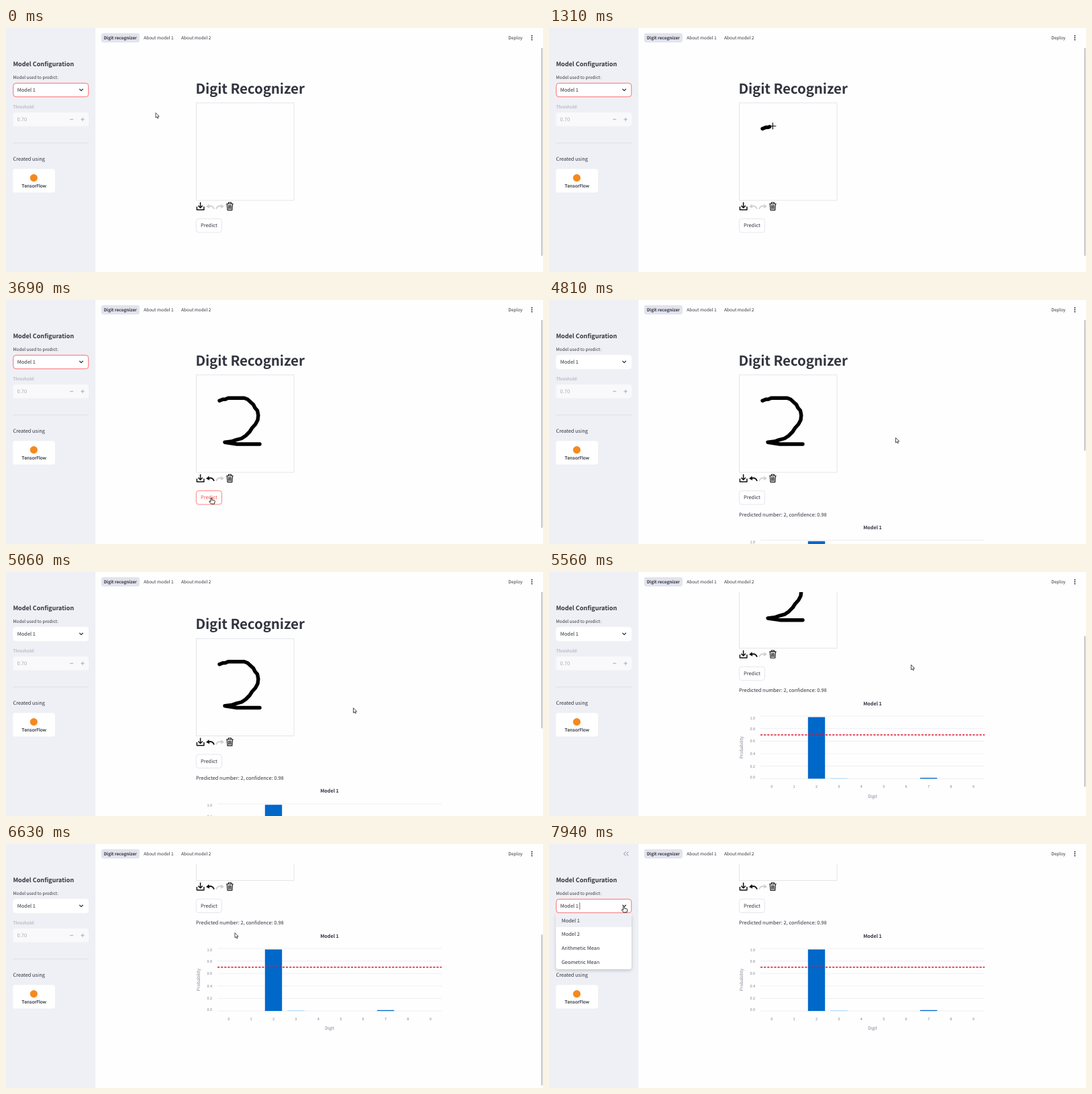
Animation, 800 px wide and 364 px high, one loop 8000 ms. Source, as an HTML page:

```html
<!DOCTYPE html>
<html lang="en">
<head>
<meta charset="utf-8">
<title>Digit Recognizer</title>
<style>
  html, body { margin: 0; width: 100%; height: 100%; overflow: hidden; background: #fff; }
  svg { display: block; width: 100vw; height: 100vh; }
  text {
    font: 7.45px "Noto Sans CJK JP", "Noto Sans CJK SC", "Noto Sans CJK", "Noto Sans", sans-serif;
    fill: #31333f; text-rendering: geometricPrecision; white-space: pre;
  }
  .small { font-size: 6.52px; }
  .bold { font-weight: 700; }
  .axis { font-size: 5.6px; fill: #808495; }
  .axis-title { font-size: 6.5px; fill: #808495; text-anchor: middle; }
  .middle { text-anchor: middle; }
  .end { text-anchor: end; }
  .line { fill: none; stroke: #31333f; stroke-width: 1.1; stroke-linecap: round; stroke-linejoin: round; }
  .card { fill: #fff; stroke: #d9dbe3; stroke-width: .7; }
  .icon { fill: none; stroke: #111; stroke-width: 1.1; stroke-linejoin: round; }
  .disabled { opacity: .4; }
</style>
</head>
<body>
<svg viewBox="0 0 800 364">
  <defs>
    <clipPath id="view"><rect x="133" y="30" width="667" height="334"/></clipPath>
    <filter id="shadow" x="-20%" y="-20%" width="140%" height="150%">
      <feDropShadow dx="0" dy="2" stdDeviation="2.5" flood-opacity=".2"/>
    </filter>
    <g id="turn">
      <path d="M3 5.2Q9.6 2.6 12 9" fill="none" stroke="currentColor" stroke-width="2"/>
      <path d="M0 5.4L4.4 1.6L5.2 8Z" fill="currentColor"/>
    </g>
  </defs>
  <rect width="800" height="364" fill="#fefefe"/>

  <g clip-path="url(#view)">
    <g id="page">
      <text class="bold" x="282.4" y="97.6" style="font-size:20.5px;letter-spacing:-.1px">Digit Recognizer</text>
      <rect class="card" x="283.4" y="111.8" width="145.6" height="145.3" style="fill:#fefefe"/>
      <path id="stroke" fill="none" stroke="#000" stroke-width="5.4" stroke-linecap="round" stroke-linejoin="round"
        d="M318 150.3L323 148.3L327 148L331 146.3H355L360 148.3L363.5 151.5L368.5 156L371 161L374.5 165L375.8 172L375 179L371.5 185.5L366.5 191L363 196.5L357 202.5L351 206.5L343 208.6L336 211L326 212.3L344 215H378"/>
      <path class="icon" style="stroke-width:1.5" d="M284.4 266.5V271.2H294.9V266.5M289.6 260V268M286.4 265L289.6 268.3L292.8 265"/>
      <use id="undo" href="#turn" x="298" y="261"/>
      <use href="#turn" color="#d0d0d0" transform="translate(325 261) scale(-1 1)"/>
      <path class="icon" d="M328.2 262.2H338.6M331.3 262V260.3H335.5V262M329.2 262.5L330 271.6H336.8L337.6 262.5M331.6 264V270M333.4 264V270M335.2 264V270"/>
      <rect id="button" class="card" x="283.3" y="284.6" width="38.2" height="20.4" rx="4"/>
      <text id="buttonText" class="middle" x="302.4" y="297.4">Predict</text>
      <g id="result">
        <text x="283" y="322.8">Predicted number: 2, confidence: 0.98</text>
        <text class="bold middle" x="482" y="342" style="font-size:7.2px">Model 1</text>
        <g id="chart"></g>
        <text class="axis-title" x="482" y="479.9">Digit</text>
        <text class="axis-title" transform="translate(289.4 405) rotate(-90)">Probability</text>
      </g>
    </g>
    <rect id="scrollbar" x="797.4" width="1.9" rx=".9" fill="#bcbdc4"/>
  </g>

  <rect x="141.8" y="7.8" width="57.2" height="13.6" rx="3.5" fill="#e2e3ec"/>
  <text class="bold" x="145.7" y="17.2" style="font-size:6.35px">Digit recognizer</text>
  <text class="small" x="205.2" y="17.2">About model 1</text>
  <text class="small" x="261" y="17.2">About model 2</text>
  <text class="small" x="748.2" y="17.2">Deploy</text>
  <path d="M783.4 11.5v0M783.4 14.5v0M783.4 17.5v0" stroke="#31333f" stroke-width="2" stroke-linecap="round"/>

  <rect width="133.3" height="364" fill="#eff0f5"/>
  <path id="collapse" class="line" style="stroke:#808495;stroke-width:1" d="M114 11.9L111.4 14.6L114 17.3M118 11.9L115.4 14.6L118 17.3"/>
  <text class="bold" x="10.4" y="56.6" style="font-size:9.05px">Model Configuration</text>
  <text class="small" x="10.4" y="76.3">Model used to predict:</text>
  <rect id="select" x="10.8" y="82.3" width="112" height="20.4" rx="4" fill="#fff" stroke-width=".8"/>
  <text x="16.8" y="95.2">Model 1</text>
  <path class="line" style="stroke-width:1.3" d="M109.8 91.3L112.1 93.6L114.4 91.3"/>
  <path id="caret" d="M45.8 87.4V97.8" stroke="#31333f" stroke-width=".7"/>
  <text class="small disabled" x="10.4" y="119.9">Threshold:</text>
  <rect x="10.5" y="126" width="112.6" height="20.5" rx="4" fill="#f9f9fc"/>
  <g class="disabled">
    <text x="16.6" y="138.9">0.70</text>
    <path class="line" d="M95.6 136.3H99.8M112 136.3H116.2M114.1 134.2V138.4"/>
  </g>
  <path d="M10.5 171.6H123" stroke="#d6d8df" stroke-width=".7"/>
  <text x="10.4" y="198.2">Created using</text>
  <rect x="10.4" y="210.2" width="62.6" height="35.4" rx="4" fill="#fff"/>
  <circle cx="41.4" cy="223.6" r="5.6" fill="#f58a1f"/>
  <text class="middle" x="41.7" y="238" style="font:500 7.05px Roboto,sans-serif">TensorFlow</text>

  <g id="menu">
    <rect x="10.5" y="103.8" width="112.5" height="83" rx="4" fill="#fff" filter="url(#shadow)"/>
    <path d="M10.5 124V107.8Q10.5 103.8 14.5 103.8H119Q123 103.8 123 107.8V124Z" fill="#eff0f5"/>
  </g>

  <path id="arrow" d="M0 0V7.4L1.7 5.9L2.9 8.3L4 7.8L2.9 5.4H5.2Z" fill="#fff" stroke="#222" stroke-width=".8" stroke-linejoin="round"/>
  <path id="cross" d="M-5 0H5M0 -5V5" stroke="#000" stroke-width="1.1"/>
  <path id="hand" d="M-.9 .6Q0 -.6 .9 .6V3.3L4.4 4.1Q5.5 4.4 5.3 5.6L4.4 9.2H-.4L-3.2 5.8Q-3.2 4.5 -1.9 4.9L-.9 5.7Z" fill="#fff" stroke="#111" stroke-width=".9" stroke-linejoin="round"/>
</svg>
<script>
const LOOP = 8000;
const RED = "#ff4b4b";
const $ = id => document.getElementById(id);
const show = (id, on) => $(id).setAttribute("visibility", on ? "visible" : "hidden");

function add(parent, tag, attrs, text = "") {
  const node = document.createElementNS("http://www.w3.org/2000/svg", tag);
  for (const name in attrs) node.setAttribute(name, attrs[name]);
  node.textContent = text;
  $(parent).append(node);
}

function buildChart() {
  const bottom = 451.6, height = 93.2, left = 315, right = 649;
  const step = (right - left) / 10;
  const yOf = value => bottom - value * height;
  const probability = { 2: .985, 3: .007, 7: .014 };
  for (let i = 0; i <= 5; i++) {
    const value = i / 5;
    const inset = i === 0 ? -.5 : i === 5 ? 4.5 : 2;
    add("chart", "path", { d: `M${left} ${yOf(value)}H${right}`, stroke: "#e6e8ef", "stroke-width": .7 });
    add("chart", "text", { class: "axis end", x: 307.2, y: yOf(value) + inset }, value.toFixed(1));
  }
  for (let digit = 0; digit < 10; digit++) {
    const center = left + step * (digit + .5), value = probability[digit] || 0;
    add("chart", "text", { class: "axis middle", x: center, y: 465.6 }, digit);
    add("chart", "rect", {
      x: center - 12.7, y: yOf(value), width: 25.4, height: value * height,
      fill: digit === 3 ? "#83c9ff" : "#0068c9"
    });
  }
  add("chart", "path", {
    d: `M${left} ${yOf(.7)}H${right}`, stroke: "#dc1432", "stroke-width": 1.5, "stroke-dasharray": "3.2 1.9"
  });
}

// Keys are [time, ...values]; each span is eased unless linear is set.
function tween(keys, t, linear) {
  let i = keys.findIndex(key => key[0] > t);
  if (i < 0) return keys.at(-1).slice(1);
  if (i === 0) return keys[0].slice(1);
  const a = keys[i - 1], b = keys[i];
  let u = (t - a[0]) / (b[0] - a[0]);
  if (!linear) u = u * u * (3 - 2 * u);
  return a.slice(1).map((value, k) => value + (b[k + 1] - value) * u);
}

const stroke = $("stroke");
const total = stroke.getTotalLength();
const DRAW_START = 1180, DRAW_END = 2980;
const ink = [[DRAW_START, 0], [1310, 11], [1700, 48], [2630, total - 52], [2900, total]];
const pen = [[DRAW_START, 0], [1310, 16], [1700, 56], [2630, total - 33], [2850, total]];
const scrollKeys = [[4950, 0], [5560, 143.3], [5950, 202.5]];
const before = [[150, 223, 126.5], [850, 312, 148], [DRAW_START, 318, 150.3]];
const after = [
  [DRAW_END, 378, 215], [3600, 306, 295], [4250, 306, 295], [4740, 516.5, 205.5],
  [5000, 516.5, 205.5], [5500, 539.5, 138.5], [6000, 539.5, 138.5], [6600, 341, 132.5],
  [6680, 341, 132.5], [7350, 111.5, 92.8]
];

function cursorAt(t) {
  if (t < DRAW_START) return tween(before, t);
  if (t > DRAW_END) return tween(after, t);
  const point = stroke.getPointAtLength(tween(pen, t, true)[0]);
  return [point.x, point.y];
}

const inside = (x, y, left, top, right, bottom) => x > left && x < right && y > top && y < bottom;

function render(t) {
  const length = tween(ink, t, true)[0];
  stroke.style.strokeDasharray = `${length} ${total + 10}`;
  show("stroke", t >= DRAW_START);

  const scroll = tween(scrollKeys, t)[0];
  const predicted = t >= 4200;
  $("page").setAttribute("transform", `translate(0 ${-scroll})`);
  show("result", predicted);
  $("undo").setAttribute("color", t >= 3080 ? "#111" : "#d0d0d0");

  const [x, y] = cursorAt(t);
  const overCanvas = t < 4000 && inside(x, y, 283, 112, 429, 257);
  const overButton = t < 5000 && inside(x, y, 283, 284, 322, 305);
  const overSelect = inside(x, y, 10, 82, 123, 103);
  const overSidebar = x < 133;
  show("cross", overCanvas);
  show("hand", overButton || overSelect);
  show("arrow", !overCanvas && !overButton && !overSelect);
  for (const id of ["cross", "hand", "arrow"]) $(id).setAttribute("transform", `translate(${x} ${y})`);
  $("button").style.stroke = overButton ? RED : "";
  $("buttonText").style.fill = overButton ? RED : "";

  $("scrollbar").setAttribute("y", scroll * .667);
  $("scrollbar").setAttribute("height", predicted ? 225 : 340);
  show("scrollbar", !overSidebar);
  show("collapse", overSidebar);

  const open = t >= 7560;
  show("menu", open);
  show("caret", open);
  $("select").setAttribute("stroke", t < 3800 || open ? RED : "#fff");
}

buildChart();
["Model 1", "Model 2", "Arithmetic Mean", "Geometric Mean"].forEach((label, i) =>
  add("menu", "text", { x: 18.7, y: 116.6 + 20.8 * i }, label));

function frame(now) {
  render(now % LOOP);
  requestAnimationFrame(frame);
}
render(0);
requestAnimationFrame(frame);
</script>
</body>
</html>
```
